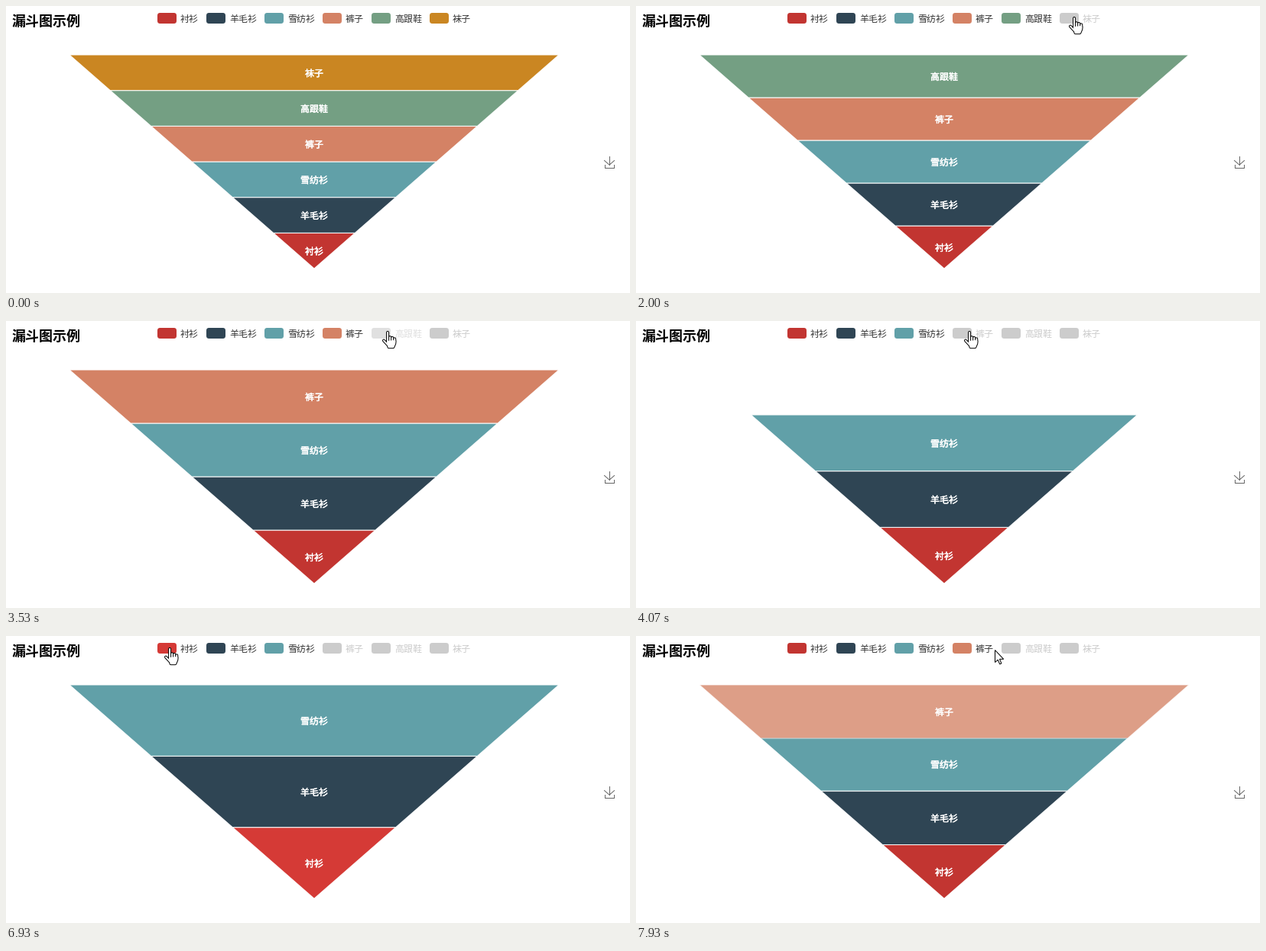
A matplotlib script that plays this animation: 816 px wide and 376 px high, repeating every 8000 ms.

```python
import matplotlib.pyplot as plt
import numpy as np
from matplotlib.animation import FuncAnimation
from matplotlib.colors import to_rgb
from matplotlib.patches import FancyBboxPatch, Polygon
from matplotlib.patheffects import withStroke

W, H, DPI = 816, 376, 100
PX = 72 / DPI
LOOP, INTERVAL = 8000, 20
TICK = 1000 / 15          # the picture only changes on these ticks
LAG = 1000 / 60           # a click is handled one screen refresh before its tick
CENTER, APEX, HEIGHT, HALF_WIDTH = 403, 344, 280, 320
GREY = "#cccccc"
plt.rcParams["font.family"] = ["Noto Sans CJK JP"]

# listed from the tip of the funnel upwards
ITEMS = [("衬衫", "#c23531"), ("羊毛衫", "#2f4554"), ("雪纺衫", "#61a0a8"),
         ("裤子", "#d48265"), ("高跟鞋", "#749f83"), ("袜子", "#ca8622")]
WIDTHS = [30 + 12 * len(name) for name, _ in ITEMS]
LEFTS = [198 + sum(WIDTHS[:i]) + 10 * i for i in range(len(ITEMS))]

# tick, number of layers left afterwards
CLICKS = [(-99, 6), (25, 5), (42, 4), (61, 3), (116, 4)]
# pointer moves: first tick, last tick, destination
ENTRY = (802, 355)
MOVES = [(4, 15, 728, 2), (17, 22, 572, 14), (31, 37, 498, 13), (53, 59, 435, 13),
         (68, 75, 279, 9), (90, 97, 213, 15), (104, 111, 409, 18),
         (112, 115, 440, 17), (117, 119, 469, 18)]

fig = plt.figure(figsize=(W / DPI, H / DPI), dpi=DPI, facecolor="white")
ax = fig.add_axes([0, 0, 1, 1], xlim=(0, W), ylim=(H, 0))
ax.axis("off")


def lift(color):
    return tuple(min(1, c * 1.1) for c in to_rgb(color))


def label(x, y, text, size=12, **style):
    return ax.text(x, y + 0.38 * size, text, size=size * PX, va="baseline", **style)


def shape(points, face, edge, width, z):
    return ax.add_patch(Polygon(points, fc=face, ec=edge, lw=width * PX, zorder=z,
                                snap=False))


def band(top, bottom):
    a, b = (HALF_WIDTH * (APEX - y) / HEIGHT for y in (top, bottom))
    return [(CENTER - a, top), (CENTER + a, top), (CENTER + b, bottom), (CENTER - b, bottom)]


def draw_save_icon(x, y):
    strokes = [[(-6.5, 5.9), (0, 11.7), (6.5, 6)],
               [(-6.5, 11.3), (-6.5, 15), (6.3, 15), (6.3, 11.3)],
               [(0, 11.7), (0, 0)]]
    for stroke in strokes:
        ax.plot(*(np.array(stroke) + (x, y)).T, color="#666666", lw=PX)


class Pointer:
    """An arrow, or a hand made of round strokes: black below, white on top."""
    ARROW = np.array([(0, 0), (0, 16), (3.7, 12.7), (6.2, 18.4), (8.4, 17.4),
                      (6, 11.8), (11.2, 11.8)]) + 0.5
    PALM = np.array([(1, 14), (10.4, 13), (10.3, 16.5), (8.3, 21.2), (2.5, 21.2)])
    THUMB = [(-4, 12.6), (1.5, 18.5)]

    def __init__(self):
        gap = (np.nan, np.nan)
        points = list(self.THUMB)
        for i, top in enumerate((1.9, 8.2, 8.9, 10.3)):
            x = 1.1 + 3.05 * i
            points += [gap, (x, top), (x, 15)]
        self.fingers = np.array(points)
        self.arrow = shape(self.ARROW, "white", "black", 1, 6)
        self.palms, self.lines = [], []
        for color, width, z in (("black", 4, 6), ("white", 2, 7)):
            palm = shape(self.PALM, color, color, width, z)
            palm.set_joinstyle("round")
            self.palms.append(palm)
            self.lines += ax.plot([], [], color=color, lw=width * PX, zorder=z,
                                  solid_capstyle="round")

    def show(self, tip, visible, is_hand):
        self.arrow.set_visible(visible and not is_hand)
        self.arrow.set_xy(self.ARROW + tip)
        for palm, line in zip(self.palms, self.lines):
            palm.set_visible(visible and is_hand)
            line.set_visible(visible and is_hand)
            palm.set_xy(self.PALM + tip)
            line.set_data(*(self.fingers + tip).T)


label(7, 19, "漏斗图示例", 18, weight="bold", color="black")
draw_save_icon(789, 196.5)
icons, names, layers, captions = [], [], [], []
for i, ((name, color), x) in enumerate(zip(ITEMS, LEFTS)):
    icon = FancyBboxPatch((x, 9), 25, 14, boxstyle="round,pad=0,rounding_size=3.5", lw=0)
    icons.append(ax.add_patch(icon))
    names.append(label(x + 30, 16.5, name))
    layers.append(shape(band(64, 344), color, "white", 1, 2 + i * 0.1))
    captions.append(label(CENTER, 0, name, ha="center", color="white", zorder=4,
                          path_effects=[withStroke(linewidth=0.3, foreground="white")]))
pointer = Pointer()


def pointer_at(tick):
    """Tip of the pointer and the tick at which its latest move began."""
    tip, began = np.array(ENTRY, float), 0
    for first, last, x, y in MOVES:
        if tick < first:
            break
        progress = min((tick - first) / (last - first), 1)
        tip = tip + (np.array((x, y)) - tip) * progress
        began = first
    return tip, began


def item_at(x, y):
    for i, (left, width) in enumerate(zip(LEFTS, WIDTHS)):
        if left <= x <= left + width and 9 <= y <= 23:
            return i
    return None


def update(frame):
    tick = int((frame * INTERVAL + 15) / TICK)
    step = max(i for i, (at, _) in enumerate(CLICKS) if at <= tick)
    clicked, count = CLICKS[step]
    before = CLICKS[max(step - 1, 0)][1]
    elapsed = (tick - clicked) * TICK + LAG
    ease = 1 - (1 - min(elapsed / 300, 1)) ** 3
    final = HEIGHT / count
    moving = HEIGHT / before + (final - HEIGHT / before) * ease

    tip, began = pointer_at(tick)
    over = item_at(*tip)
    pointer.show(tip, tick >= 4 and tick != 16, over is not None)
    # a click clears the emphasis until the pointer moves again
    active = over if began > clicked else None

    for i, (_, color) in enumerate(ITEMS):
        on = i < count
        icon_color, text_color = (color, "#333333") if on else (GREY, GREY)
        if i == active:
            icon_color, text_color = lift(icon_color), lift(text_color)
        icons[i].set_facecolor(icon_color)
        names[i].set_color(text_color)
        layers[i].set_visible(on)
        captions[i].set_visible(on)

        added = i >= before
        unit = final if added else moving
        top, bottom = APEX - unit * (i + 1), APEX - unit * i
        layers[i].set_xy(band(top, bottom))
        layers[i].set_facecolor(icon_color)
        layers[i].set_alpha(1 - 2 ** (-elapsed / 100) if added else 1)
        captions[i].set_y((top + bottom) / 2 + 5)
    return []


anim = FuncAnimation(fig, update, frames=LOOP // INTERVAL, interval=INTERVAL, repeat=True,
                     repeat_delay=0, blit=False)
plt.show()
```
